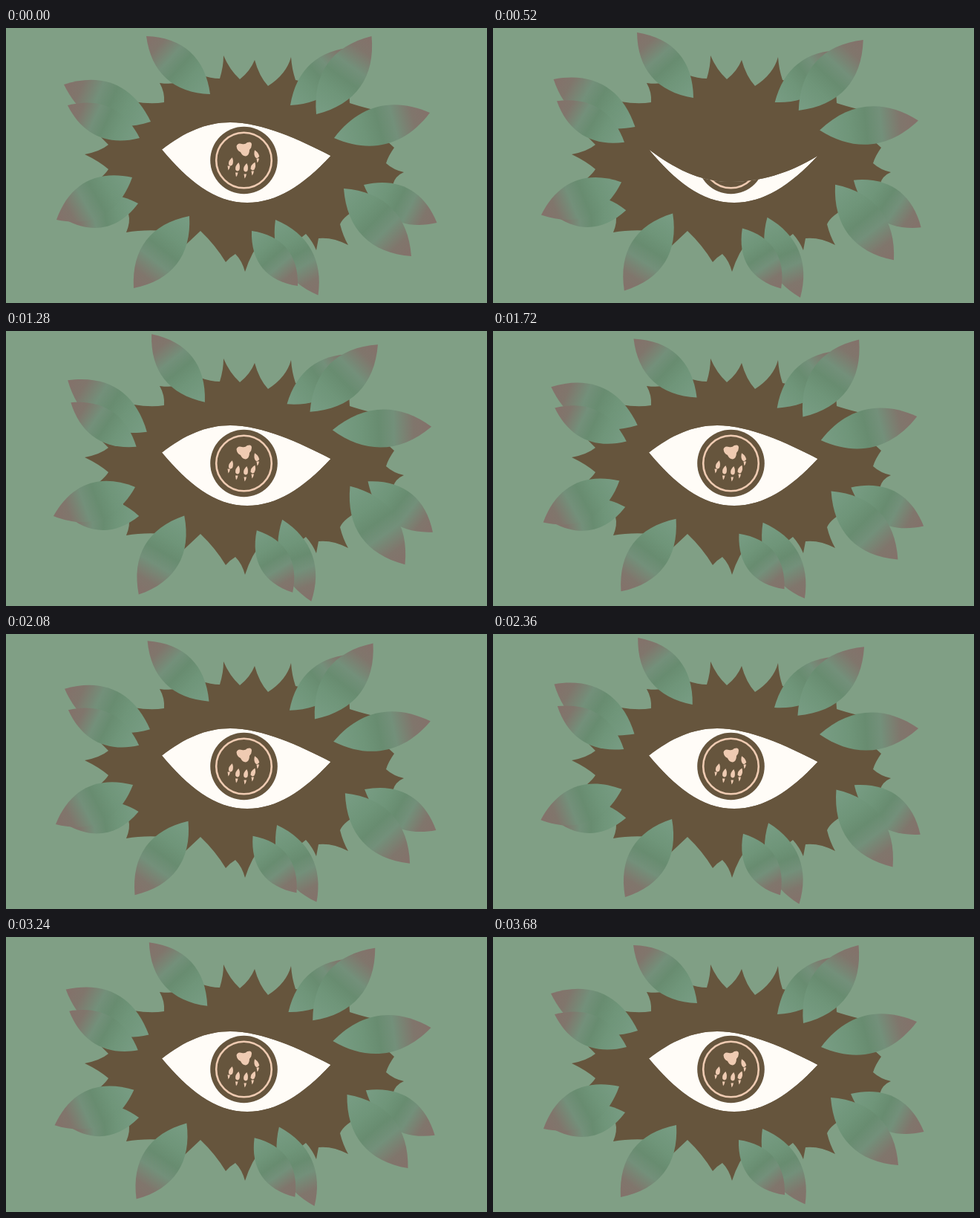
Write an HTML page with a canvas that moves like this. It is 648 px wide and 370 px high and loops after 3840 ms.

```html
<!DOCTYPE html>
<html lang="en">
<head>
<meta charset="utf-8">
<title>Blinking eye among leaves</title>
<style>
  html, body { margin: 0; width: 100%; height: 100%; overflow: hidden; background: #809f85; }
  canvas { display: block; }
</style>
</head>
<body>
<canvas id="stage" width="648" height="370"></canvas>
<script>
const ctx = document.getElementById('stage').getContext('2d');
const LOOP = 3840, STEP = 40;
const BROWN = '#66553d', WHITE = '#fffcf7', PINK = '#efcbb2';

const bush = new Path2D(`M106 170 Q127 166 138 157 L128 147 Q135 148 145 147 L150 122 L172 99
  Q195 103 213 100 Q214 86 207 74 Q235 78 262 63 Q276 68 288 68 Q293 52 293 37 Q301 56 315 69
  Q329 58 335 43 Q341 65 353 78 Q378 62 384 39 Q385 55 390 70 L462 85 L463 101 Q475 105 491 109
  L500 140 L523 161 Q515 172 512 182 Q522 191 536 194 Q524 199 521 211 L480 240 Q455 252 450 264
  Q454 280 461 292 Q440 281 421 283 L418 299 Q413 287 404 277 L375 300 L345 285 Q331 300 322 328
  Q318 313 309 304 Q302 308 296 315 Q282 292 262 273 Q247 287 228 305 L213 273 Q185 271 162 275
  Q168 261 165 250 L150 215 L126 203 Q135 195 138 190 Q125 179 106 170Z`);

// tip x, tip y, base x, base y, half width, swing in degrees
const leaves = [
  [189, 11, 275, 89, 24, 13.6],
  [78, 76, 195, 126, 27, 14],
  [83, 104, 180, 148, 21, 13.6],
  [80, 258, 178, 236, 21, 21],
  [68, 258, 170, 201, 25, 13.6],
  [172, 350, 247, 253, 26, -10.8],
  [420.5, 359.5, 363, 258, 22, 14],
  [393, 347, 331, 273, 21, 14],
  [580.5, 262, 482, 211, 23, 15],
  [546, 307, 455, 216, 27, 14],
  [571, 114, 442, 148, 25.5, 18],
  [470, 26, 383, 104, 23, 10],
  [492.5, 11, 418, 116, 27, 14]
];
const leafColors = [[0, '#84716a'], [.18, '#80766c'], [.38, '#73907a'],
  [.53, '#688c70'], [.7, '#6f9579'], [1, '#789d84']];

// control points of the upper lid, open and shut
const lidOpen = [240, 140, 270, 127, 302, 127, 345, 127, 395, 150];
const lidShut = [245, 205, 280, 235, 325, 235, 365, 235, 400, 212];

const pad = new Path2D(`M310.5 159 Q312 154 318 156 Q322 157 325 154 Q331 152 331 157
  Q331 161 328 164 Q328 171 323 172.5 Q318 172 316 167 Q311 165 310.5 159Z`);
const toe = new Path2D('M1 -6 Q4 -1 2.5 4 Q0 7 -2.5 4 Q-4 -1 1 -6Z');
const claw = new Path2D('M-1.5 -2.5 L2 -2.5 Q1.5 1 -.5 3.5Z');
// toe x, toe y, claw x, claw y, toe tilt
const toes = [[303, 180, 300, 188, 8], [312, 187, 310.5, 197, 4], [323, 188, 322, 199, 3],
  [333, 186, 332, 195, 14], [337, 170, 339, 178, -28]];

const rad = deg => deg * Math.PI / 180;
const clamp = (v, lo, hi) => Math.min(hi, Math.max(lo, v));
const wave = (t, start, period, cycles = 1) =>
  Math.sin(Math.PI * clamp(t - start, 0, period * cycles) / period) ** 2;

function fill(path, color) {
  ctx.fillStyle = color;
  ctx.fill(path);
}

function at(x, y, deg, draw) {
  ctx.save();
  ctx.translate(x, y);
  ctx.rotate(rad(deg));
  draw();
  ctx.restore();
}

function drawLeaf([x1, y1, x2, y2, width, swing], amount) {
  const h = Math.hypot(x2 - x1, y2 - y1) / 2, c = width / .75, k = h * .35;
  const angle = Math.atan2(y2 - y1, x2 - x1) * 180 / Math.PI;
  at((x1 + x2) / 2, (y1 + y2) / 2, angle + swing * amount, () => {
    const shade = ctx.createLinearGradient(-h, 0, h, 0);
    leafColors.forEach(stop => shade.addColorStop(...stop));
    fill(new Path2D(`M${-h} 0 C${-k} ${-c} ${k} ${-c} ${h} 0 C${k} ${c} ${-k} ${c} ${-h} 0Z`), shade);
  });
}

function drawEye(shut) {
  const lid = lidOpen.map((v, i) => v + (lidShut[i] - v) * shut);
  const eye = new Path2D(`M210 163.5 C${lid.slice(0, 6)} C${lid.slice(6)} 437.5 172
    C400 212 365 235 325 235 C280 235 245 205 210 163.5Z`);
  ctx.save();
  ctx.clip(eye);
  fill(eye, WHITE);
  ctx.beginPath();
  ctx.arc(320.5, 178, 45.3, 0, 7);
  ctx.fillStyle = BROWN;
  ctx.fill();
  ctx.beginPath();
  ctx.arc(320.5, 178, 37.3, 0, 7);
  ctx.strokeStyle = PINK;
  ctx.lineWidth = 2.6;
  ctx.stroke();
  fill(pad, PINK);
  for (const [x, y, clawX, clawY, tilt] of toes) {
    at(x, y, tilt, () => fill(toe, PINK));
    at(clawX, clawY, 0, () => fill(claw, PINK));
  }
  ctx.restore();
}

function draw(t) {
  ctx.fillStyle = '#809f85';
  ctx.fillRect(0, 0, 648, 370);
  fill(bush, BROWN);
  const sway = wave(t, 70, 1775, 2);
  leaves.forEach(leaf => drawLeaf(leaf, sway));
  drawEye(wave(t, 278, 734));
}

function tick() {
  const t = performance.now() % LOOP;
  draw(Math.floor(t / STEP) * STEP);
  requestAnimationFrame(tick);
}
tick();
</script>
</body>
</html>
```
